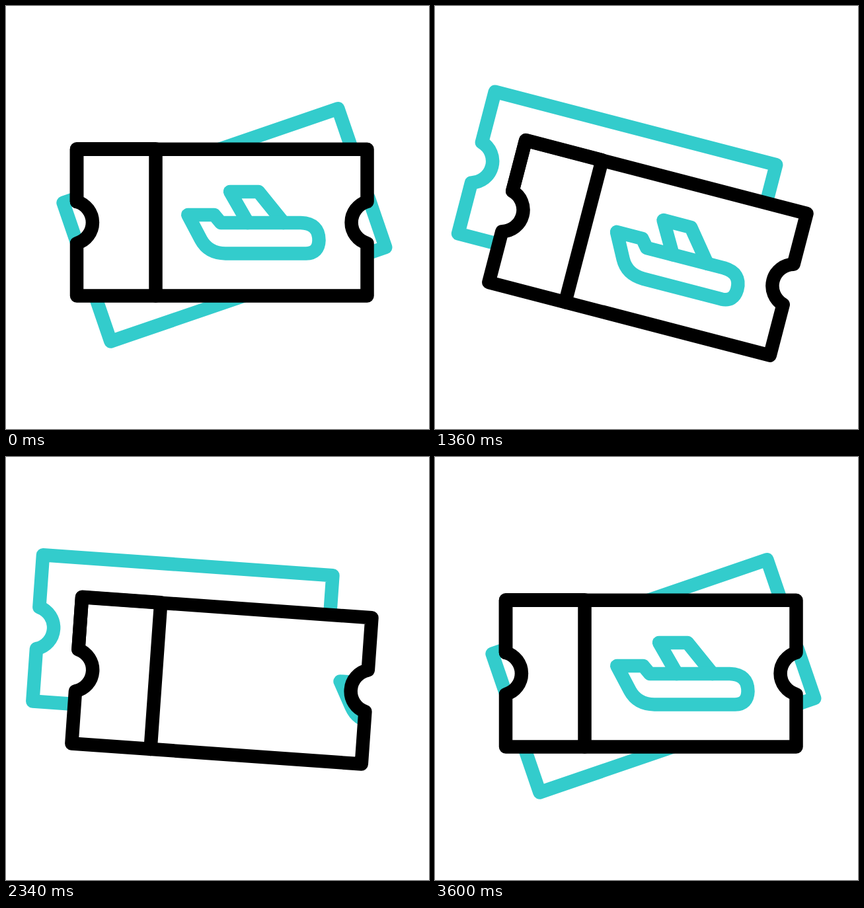
An HTML page that plays this animation: 640 by 640 pixels, repeating every 3620 ms.

```html
<!DOCTYPE html>
<html lang="en">
<head>
<meta charset="utf-8">
<title>Boat tickets</title>
<style>
  html, body { margin: 0; width: 100%; height: 100%; overflow: hidden; background: #fff; }
  svg { display: block; width: 100vw; height: 100vh; }
  .line { stroke-width: 20.5; stroke-linecap: round; stroke-linejoin: round; }
  .teal { stroke: #33cccc; }
  .ink { stroke: #000; }
</style>
</head>
<body>
<svg viewBox="0 0 640 640">
  <defs>
    <path id="ticket" d="M107 216.7H546.5V296A32.7 32.7 0 0 0 546.5 359V438.5H107V359A32.7 32.7 0 0 0 107 296Z"/>
    <clipPath id="panel">
      <path d="M226.5 216.7H546.5V296A32.7 32.7 0 0 0 546.5 359V438.5H226.5Z"/>
    </clipPath>
  </defs>
  <g id="pair">
    <use id="back" href="#ticket" class="line teal" fill="#fff"/>
    <use href="#ticket" fill="#fff"/>
    <g clip-path="url(#panel)">
      <g id="boat" class="line teal" fill="none">
        <path d="M366 328L339 281H382L420 328"/>
        <path d="M275.2 316H315L325 328H446Q473.5 329 473.5 354.5Q473 374 454 374.5H332Q306 374 295 353.5Z"/>
      </g>
    </g>
    <g class="line ink" fill="none">
      <use href="#ticket"/>
      <path d="M107 296V216.3H226.5V438.5"/>
    </g>
  </g>
</svg>
<script>
const LOOP = 3620;
const [pair, back, boat] = ['pair', 'back', 'boat'].map(id => document.getElementById(id));

// Each key is [time, value]; values ease in and out between keys.
const fan = [[200, 1], [800, 0], [2980, 0], [3580, 1]];
const sway = [[800, 0], [1320, 15], [1825, -8], [2335, 4.05], [2980, 0]];
const sailOut = [[1920, 0], [2520, 293]];
const sailIn = [[2520, -285], [2921, 0]];

function ease(u) {
  return u * u * (3 - 2 * u);
}

function at(keys, t) {
  if (t <= keys[0][0]) return keys[0][1];
  for (let i = 1; i < keys.length; i++) {
    const [t0, a] = keys[i - 1];
    const [t1, b] = keys[i];
    if (t < t1) return a + (b - a) * ease((t - t0) / (t1 - t0));
  }
  return keys[keys.length - 1][1];
}

function draw(t) {
  const f = at(fan, t);
  const x = -63.4 + 67 * f;
  const y = -59.7 + 63.5 * f;
  const sail = at(t < 2520 ? sailOut : sailIn, t);
  back.setAttribute('transform', `translate(${x} ${y}) rotate(${-18.9 * f} 326.75 327.5)`);
  pair.setAttribute('transform', `rotate(${at(sway, t)} 174 328)`);
  boat.setAttribute('transform', `translate(${sail} 0)`);
}

const start = performance.now();
function tick(now) {
  draw(Math.max(0, now - start) % LOOP);
  requestAnimationFrame(tick);
}
draw(0);
requestAnimationFrame(tick);
</script>
</body>
</html>
```
